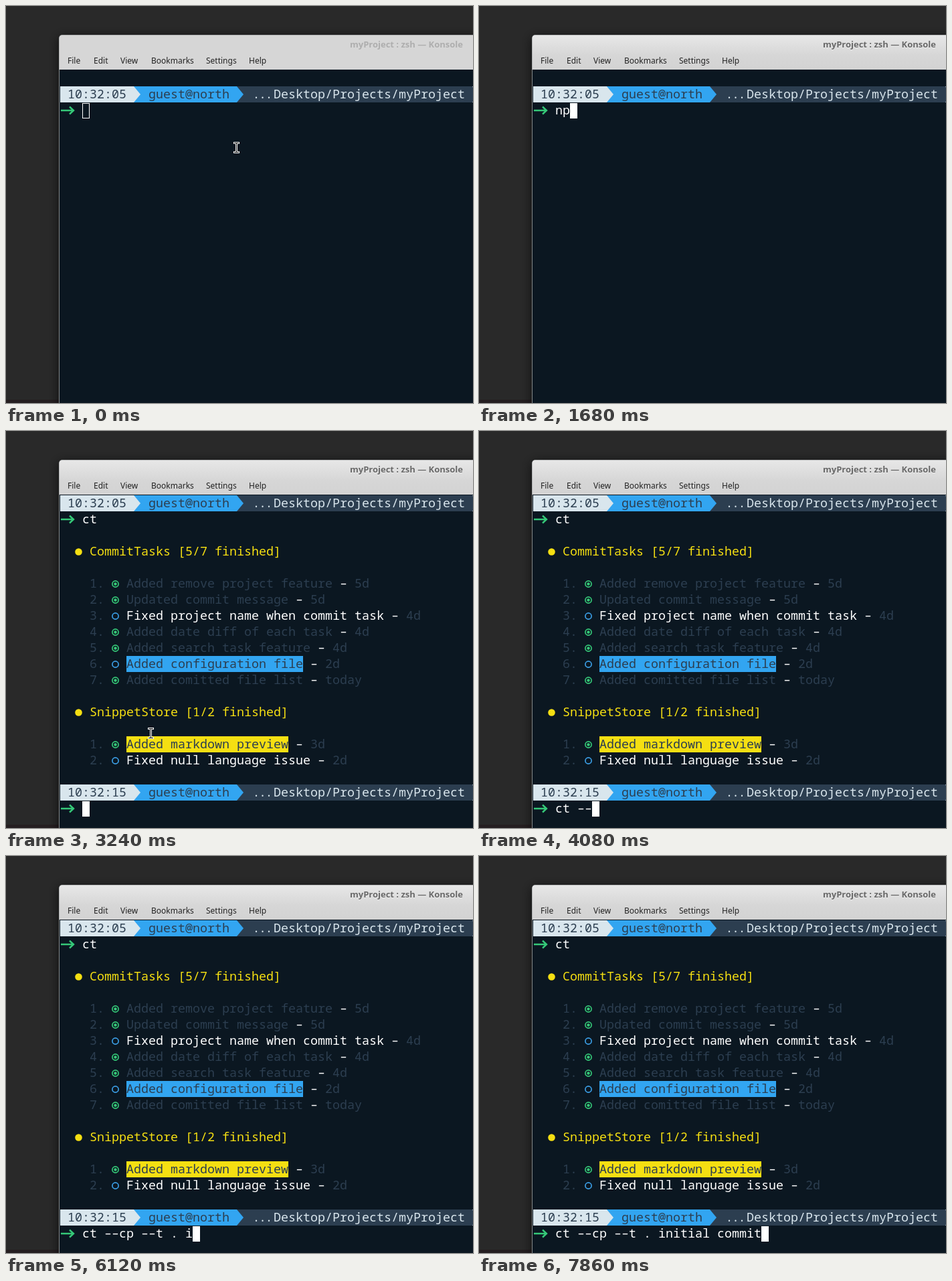
Animation, 698 px wide and 593 px high, one loop 8 s. Source, as an HTML page with a canvas:

```html
<!DOCTYPE html>
<html lang="en">
<head>
<meta charset="utf-8">
<title>Terminal task list</title>
<style>
  html, body { margin: 0; width: 100%; height: 100%; overflow: hidden; background: #292929; }
  canvas { display: block; }
</style>
</head>
<body>
<canvas id="stage" width="698" height="593"></canvas>
<script>
const ctx = document.getElementById('stage').getContext('2d');
const LOOP = 8000, CELL = 11, ROW = 24, LEFT = 81, TOP = 96;
const MONO = '18.333px "Noto Sans Mono", "DejaVu Sans Mono", monospace';
const SANS = '"Noto Sans", "Open Sans", sans-serif';
const C = {
  back: '#0b1721', white: '#ffffff', pale: '#d9e6ed', slate: '#2c3e50',
  blue: '#32a5f1', ring: '#3b9ee5', yellow: '#f5df12', green: '#35c878'
};

// [time, typed text] for each prompt; a shorter text is a backspace
const firstTyping = [
  [0, ''], [1500, 'n'], [1680, 'np'], [1920, 'n'], [1980, ''], [2160, 'c'], [2280, 'ct']
];
const secondTyping = [
  [0, ''], [3420, 'c'], [3600, 'ct'], [3660, 'ct '], [3900, 'ct -'], [4080, 'ct --'],
  [4320, 'ct --c'], [4440, 'ct --cp'], [4560, 'ct --cp '], [4680, 'ct --cp -'],
  [4860, 'ct --cp --'], [4980, 'ct --cp --t'], [5040, 'ct --cp --t '],
  [5160, 'ct --cp --t .'], [5340, 'ct --cp --t . '],
  ...[6120, 6240, 6300, 6360, 6480, 6540, 6600, 6720].map(
    (time, i) => [time, 'ct --cp --t . ' + 'initial '.slice(0, i + 1)]),
  ...[[6960, 'c'], [7080, 'com'], [7320, 'comi'], [7560, 'com'],
      [7740, 'comm'], [7800, 'commi'], [7860, 'commit']].map(
    ([time, word]) => [time, 'ct --cp --t . initial ' + word])
];
const ENTER = 2400, OUTPUT = 2460, NEXT_PROMPT = 2520;

// Pointer paths, [time, x, y]; hidden from the last time on
const pointerPaths = [
  [[0, 344, 211], [60, 344, 211], [180, 344, 206], [720, 344, 206], [1320, 375, 196], [1500, 375, 196]],
  [[2820, 339, 21], [2940, 290, 110], [3060, 212, 270], [3120, 195, 360], [3180, 206, 435],
   [3240, 216, 451], [3420, 216, 451]]
];

const groups = [
  { row: 4, title: 'CommitTasks [5/7 finished]', tasks: [
    ['Added remove project feature', '5d', 'done'],
    ['Updated commit message', '5d', 'done'],
    ['Fixed project name when commit task', '4d', 'open'],
    ['Added date diff of each task', '4d', 'done'],
    ['Added search task feature', '4d', 'done'],
    ['Added configuration file', '2d', 'open', C.blue],
    ['Added comitted file list', 'today', 'done']
  ] },
  { row: 14, title: 'SnippetStore [1/2 finished]', tasks: [
    ['Added markdown preview', '3d', 'done', C.yellow],
    ['Fixed null language issue', '2d', 'open']
  ] }
];

const colX = col => LEFT + col * CELL;
const rowY = row => TOP + row * ROW;
const latest = (steps, t) => steps.filter(([time]) => time <= t).pop()[1];

function rect(x, y, w, h, color) {
  ctx.fillStyle = color;
  ctx.fillRect(x, y, w, h);
}

function polygon(points, color) {
  ctx.beginPath();
  points.forEach(([x, y]) => ctx.lineTo(x, y));
  ctx.closePath();
  ctx.fillStyle = color;
  ctx.fill();
}

function circle(x, y, r, color, lineWidth) {
  ctx.beginPath();
  ctx.arc(x, y, r, 0, Math.PI * 2);
  if (lineWidth) {
    ctx.strokeStyle = color;
    ctx.lineWidth = lineWidth;
    ctx.stroke();
  } else {
    ctx.fillStyle = color;
    ctx.fill();
  }
}

// Terminal text sits on a fixed cell grid
function cells(text, x, y, color, step = CELL) {
  ctx.font = MONO;
  ctx.fillStyle = color;
  [...text].forEach((ch, i) => ctx.fillText(ch === '-' ? '–' : ch, x + i * step, y + 18));
}

function label(text, x, y, font, color) {
  ctx.font = font;
  ctx.fillStyle = color;
  ctx.fillText(text, x, y);
}

function separator(x, y, color) {
  polygon([[x, y], [x + 10, y + ROW / 2], [x, y + ROW]], color);
}

function statusBar(row, clock) {
  const y = rowY(row);
  rect(81, y, 110, ROW, C.pale);
  rect(191, y, 154, ROW, C.blue);
  rect(345, y, 352, ROW, C.slate);
  rect(697, y, 1, ROW, C.pale);
  separator(191, y, C.pale);
  separator(345, y, C.blue);
  separator(697, y, C.slate);
  cells(clock, colX(1), y, C.slate);
  cells('guest@north', colX(12), y, C.slate);
  cells('...', 368.5, y, C.pale, 9.5);
  cells('Desktop/Projects/myProject', colX(29), y, C.pale);
}

function promptLine(row, text) {
  const y = rowY(row) + 12;
  ctx.strokeStyle = C.green;
  ctx.lineWidth = 2.4;
  ctx.beginPath();
  ctx.moveTo(82, y);
  ctx.lineTo(101, y);
  ctx.moveTo(95, y - 5.5);
  ctx.lineTo(101, y);
  ctx.lineTo(95, y + 5.5);
  ctx.stroke();
  cells(text, colX(3), rowY(row), C.white);
}

function taskGroup({ row, title, tasks }) {
  circle(108.5, rowY(row) + 12.5, 5.3, C.yellow);
  cells(title, colX(4), rowY(row), C.yellow);
  tasks.forEach(([name, age, state, mark], i) => {
    const y = rowY(row + 2 + i), end = 9 + name.length, done = state === 'done';
    cells(`${i + 1}.`, colX(4), y, C.slate);
    circle(163.5, y + 12.5, 4.6, done ? C.green : C.ring, 1.7);
    if (done) circle(163.5, y + 12.5, 2.2, C.green);
    if (mark) rect(colX(9), y, name.length * CELL, ROW, mark);
    cells(name, colX(9), y, done || mark ? C.slate : C.white);
    cells('-', colX(end + 1), y, C.white);
    cells(age, colX(end + 3), y, C.slate);
  });
}

function caret(col, row, filled) {
  const x = colX(col), y = rowY(row) + 1;
  if (filled) return rect(x, y, 11, 23, C.white);
  ctx.strokeStyle = C.white;
  ctx.lineWidth = 1;
  ctx.strokeRect(x + .5, y + .5, 10, 22);
}

function desktopAndFrame(t) {
  rect(0, 0, 698, 593, '#292929');
  rect(0, 588, 80, 5, '#251f21');
  ctx.save();
  ctx.shadowColor = 'rgba(0,0,0,.65)';
  ctx.shadowBlur = 16;
  ctx.shadowOffsetY = 3;
  ctx.fillStyle = '#85898b';
  ctx.beginPath();
  ctx.roundRect(79, 43, 660, 600, 5);
  ctx.fill();
  ctx.restore();

  const focus = Math.max(0, Math.min(1, Math.floor(t / 60) / 3));
  const grey = (off, on) => {
    const v = Math.round(off + (on - off) * focus);
    return `rgb(${v},${v},${v})`;
  };
  const shade = ctx.createLinearGradient(0, 43, 0, 95);
  shade.addColorStop(0, grey(214, 232));
  shade.addColorStop(.6, grey(214, 214));
  shade.addColorStop(1, grey(214, 211));
  ctx.fillStyle = shade;
  ctx.beginPath();
  ctx.roundRect(79.5, 43.5, 660, 51.5, [4.5, 0, 0, 0]);
  ctx.fill();

  const titleFont = 'bold 13px ' + SANS, title = 'myProject : zsh — Konsole';
  label(title, 514, 63, titleFont, `rgba(255,255,255,${focus * .6})`);
  label(title, 514, 62, titleFont, grey(174, 104));
  [['File', 92], ['Edit', 131], ['View', 171], ['Bookmarks', 217], ['Settings', 299], ['Help', 363]]
    .forEach(([name, x]) => label(name, x, 86, '12px ' + SANS, '#222222'));
  rect(80, 95, 618, 498, C.back);
}

function pointerAt(t) {
  const path = pointerPaths.find(p => t >= p[0][0] && t < p[p.length - 1][0]);
  if (!path) return null;
  const time = Math.floor(t / 60) * 60;
  const i = path.findIndex(([end]) => end > time);
  const [t0, x0, y0] = path[i - 1], [t1, x1, y1] = path[i];
  const k = (time - t0) / (t1 - t0);
  return [Math.round(x0 + (x1 - x0) * k), Math.round(y0 + (y1 - y0) * k)];
}

function pointer(t) {
  const spot = pointerAt(t);
  if (!spot) return;
  const [x, y] = spot;
  if (y < 95) {
    const arrow = [[0, 0], [0, 15], [4, 11], [10, 11]].map(([dx, dy]) => [x + dx, y - 8 + dy]);
    polygon(arrow, '#111111');
    ctx.strokeStyle = C.white;
    ctx.lineWidth = 1;
    ctx.stroke();
    return;
  }
  const beam = (grow, color) => {
    rect(x - 3 - grow, y - 7 - grow, 7 + 2 * grow, 1 + 2 * grow, color);
    rect(x - 3 - grow, y + 7 - grow, 7 + 2 * grow, 1 + 2 * grow, color);
    rect(x - grow, y - 7, 1 + 2 * grow, 15, color);
  };
  beam(1, C.white);
  beam(0, '#111111');
}

function draw(t) {
  desktopAndFrame(t);
  const scrolled = t >= NEXT_PROMPT, command = latest(firstTyping, t);

  ctx.save();
  if (scrolled) ctx.translate(0, -ROW);
  statusBar(1, '10:32:05');
  promptLine(2, command);
  if (t >= OUTPUT) groups.forEach(taskGroup);
  if (scrolled) {
    const text = latest(secondTyping, t);
    statusBar(19, '10:32:15');
    promptLine(20, text);
    caret(3 + text.length, 20, true);
  } else if (t >= OUTPUT) {
    caret(0, 18, true);
  } else if (t >= ENTER) {
    caret(0, 3, true);
  } else {
    caret(3 + command.length, 2, t >= 60);
  }
  ctx.restore();
  pointer(t);
}

const start = performance.now();
function tick() {
  draw((performance.now() - start) % LOOP);
  requestAnimationFrame(tick);
}
tick();
</script>
</body>
</html>
```
